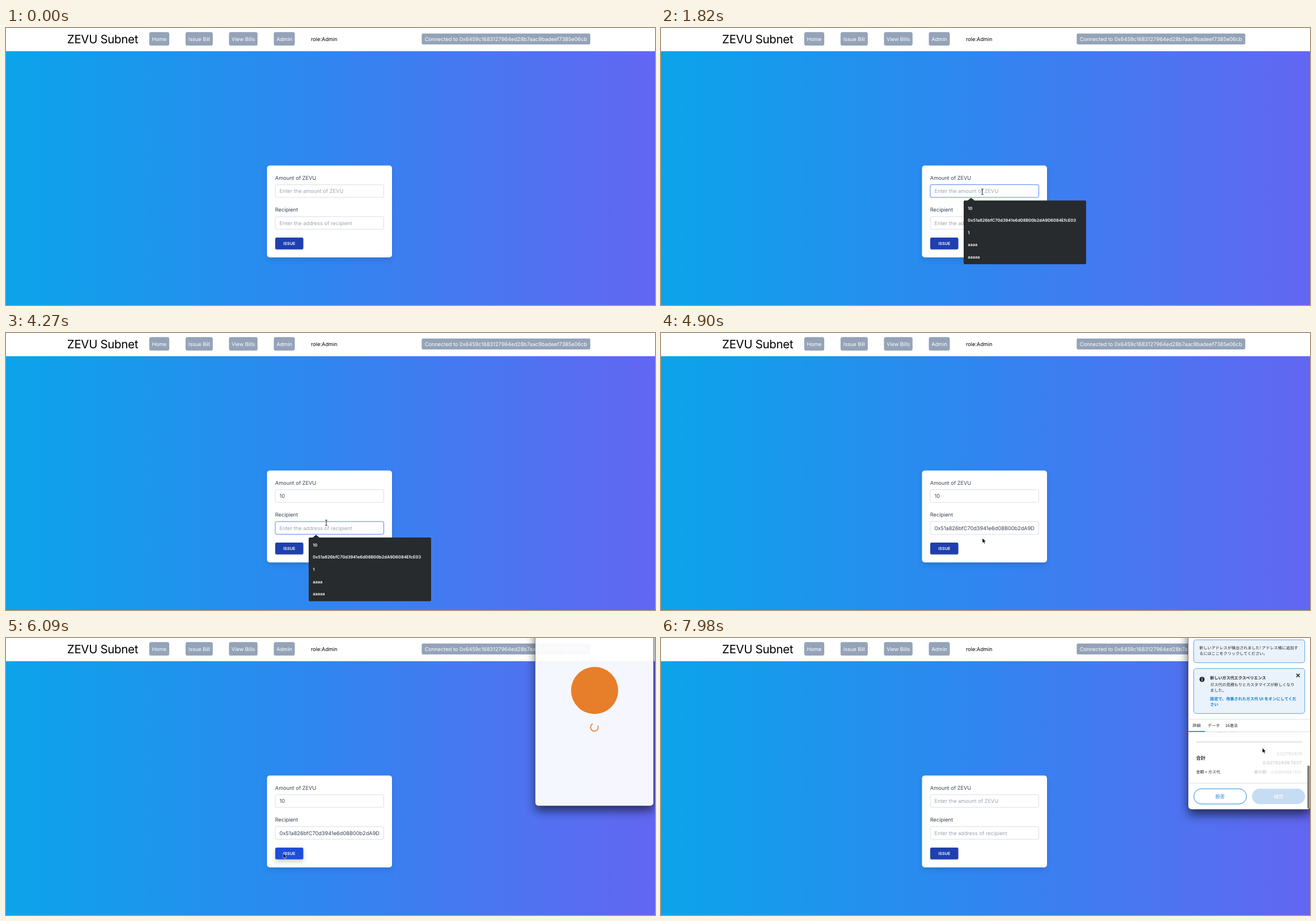
Recreate the animation shown at these times as an HTML page. Size 1145 by 489 pixels, loop 8000 ms.

```html
<!DOCTYPE html>
<html lang="en">
<head>
<meta charset="utf-8">
<title>Issue Bill</title>
<style>
html, body { margin: 0; width: 100%; height: 100%; overflow: hidden; background: #fff; }
svg { display: block; width: 100%; height: 100%; }
text { font: 9.2px Inter, "Open Sans", sans-serif; text-rendering: geometricPrecision; white-space: pre; }
.mid { text-anchor: middle; }
.end { text-anchor: end; }
.title { font-size: 20.5px; letter-spacing: -.35px; text-anchor: end; }
.nav rect { fill: #94a3b8; }
.nav text { fill: #fff; }
.card { fill: #fff; filter: drop-shadow(0 5px 5px rgba(0,0,0,.1)); }
.label { fill: #374151; }
.box { fill: #fff; stroke: #d1d5db; stroke-width: .8; }
.box.on { stroke: #2563eb; }
.value { fill: #9ca3af; }
.value.set { fill: #374151; }
.issue rect { fill: #1e40af; filter: drop-shadow(0 1.5px 1.5px rgba(0,0,0,.2)); }
.issue.hot rect { fill: #1d4ed8; filter: drop-shadow(0 4px 4px rgba(0,0,0,.2)); }
.issue text { font-size: 7.2px; font-weight: 600; fill: #fff; }
.menu { fill: #282b2d; }
.menu text { font-size: 7.4px; font-weight: 600; fill: #fff; }
.frame { fill: #fff; stroke: rgba(0,0,0,.65); stroke-width: .7; filter: drop-shadow(0 9px 9px rgba(0,0,0,.6)); }
.ja text { font: 7.1px "Noto Sans CJK JP", "Noto Sans CJK", sans-serif; fill: #24272a; }
.ja .b { font-weight: 700; }
.ja .link { fill: #037dd6; font-weight: 700; }
.ja .num { font-family: Inter, sans-serif; font-size: 7.8px; }
.note { fill: #eaf2fb; stroke: #459bdb; stroke-width: .9; }
.rule { stroke: #d6d9dc; stroke-width: .8; }
</style>
</head>
<body>
<svg viewBox="0 0 1145 489" preserveAspectRatio="none">
  <defs>
    <linearGradient id="sky">
      <stop offset="0" stop-color="#0ba4ea"/>
      <stop offset=".5" stop-color="#3185f0"/>
      <stop offset="1" stop-color="#6366f2"/>
    </linearGradient>
    <clipPath id="details"><rect x="930" y="166" width="216" height="90"/></clipPath>
  </defs>
  <rect width="1145" height="489" fill="#fff"/>
  <rect y="41" width="1145" height="448" fill="url(#sky)"/>

  <text class="title" x="233" y="27">ZEVU Subnet</text>
  <g class="nav">
    <rect x="252.7" y="7.3" width="35.3" height="23.8" rx="3.4"/><text class="mid" x="270.3" y="22.8">Home</text>
    <rect x="316.8" y="7.3" width="48" height="23.8" rx="3.4"/><text class="mid" x="340.8" y="22.8">Issue Bill</text>
    <rect x="393.4" y="7.3" width="50.4" height="23.8" rx="3.4"/><text class="mid" x="418.6" y="22.8">View Bills</text>
    <g id="admin"><rect x="472.5" y="7.3" width="37" height="23.8" rx="3.4"/><text class="mid" x="491" y="22.8">Admin</text></g>
    <g id="wallet"><rect x="733.4" y="9.7" width="297.4" height="19.2" rx="2.4"/><text class="mid" x="882" y="22.8">Connected to 0x6459c1683127964ed28b7aac9badeef7385e06cb</text></g>
  </g>
  <text id="role" y="22.8"></text>

  <rect class="card" x="460.5" y="242.8" width="220.5" height="162.2" rx="4.8"/>
  <text class="label" x="474.8" y="267.8">Amount of ZEVU</text>
  <rect class="box" id="box1" x="475" y="276.6" width="191.5" height="22.4" rx="2.4"/>
  <text class="value" id="val1" x="482.5" y="291.2"></text>
  <text class="label" x="474.8" y="324.2">Recipient</text>
  <rect class="box" id="box2" x="475" y="332.9" width="191.5" height="22.4" rx="2.4"/>
  <text class="value" id="val2" x="482.5" y="347.5"></text>
  <rect id="caret" width=".8" height="11" fill="#374151"/>
  <g class="issue" id="issue"><rect x="475" y="370" width="49.5" height="20.8" rx="2.4"/><text class="mid" x="499.8" y="383">ISSUE</text></g>

  <g class="menu" id="menu">
    <path d="M540.5 305L547 299.8L553.5 305Z"/>
    <rect x="534" y="304.5" width="216" height="112.5" rx="2"/>
    <text x="541.3" y="320.5">10</text>
    <text x="541.3" y="342.1">0x51a826bfC70d3941e6d08B00b2dA9D6084EfcE03</text>
    <text x="541.3" y="363.7">1</text>
    <text x="541.3" y="385.3">aaaa</text>
    <text x="541.3" y="406.9">aaaaa</text>
  </g>

  <g id="popup">
    <rect class="frame" x="930" y="-76" width="216" height="378.7" rx="6"/>
    <g id="loading">
      <circle cx="1038.5" cy="92" r="43" fill="#f0801f"/>
      <path id="spinner" d="M1038 166.2A7 7 0 1 1 1045 159.2" fill="none" stroke="#f0801f" stroke-width="1.8"/>
    </g>
    <g id="confirm" class="ja" lang="ja">
      <rect class="note" x="939.8" y="3.2" width="196" height="40.4" rx="4.5"/>
      <text x="949.8" y="20">新しいアドレスが検出されました! アドレス帳に追加す</text>
      <text x="949.8" y="30.4">るにはここをクリックしてください。</text>
      <rect class="note" x="939.8" y="53.8" width="196" height="79.5" rx="4.5"/>
      <circle cx="954.5" cy="73" r="4.5" fill="#24272a"/>
      <path d="M954.5 70.2V71.4M954.5 72.4V75.8" stroke="#fff" stroke-width="1.2"/>
      <path d="M1121 63.2L1126.8 69M1126.8 63.2L1121 69" stroke="#111" stroke-width="1.4"/>
      <text class="b" x="968.8" y="73">新しいガス代エクスペリエンス</text>
      <text x="968.8" y="85">ガス代の見積もりとカスタマイズが新しくなり</text>
      <text x="968.8" y="95">ました。</text>
      <text class="link" x="968.8" y="110">設定で、改善されたガス代 UI をオンにしてくだ</text>
      <text class="link" x="968.8" y="120.2">さい</text>
      <path class="rule" d="M930.4 143.4H1145M930.4 165.5H1145M930.4 256.3H1145"/>
      <text x="937.8" y="156.8">詳細</text>
      <text x="964.6" y="156.8">データ</text>
      <text x="995.4" y="156.8">16進法</text>
      <path d="M930.4 165H960" stroke="#037dd6" stroke-width="1.5"/>
      <g clip-path="url(#details)">
        <text x="953" y="166.4" opacity=".55">サイトの提案 &gt; 最大</text>
        <path d="M944 183.6H1131" stroke="#bbc0c5" stroke-width=".9"/>
        <text class="b" x="944" y="214.6" style="font-size:8.4px">合計</text>
        <text x="944" y="238.6">金額 + ガス代</text>
        <g id="totals">
          <text class="num end" x="1131" y="206.8">0.02792409</text>
          <text class="num b end" x="1131" y="222.8">0.02792409 TEST</text>
          <text class="b end" x="1070" y="238.6">最大額:</text>
          <text class="num end" x="1131" y="238.6" style="font-size:6.5px">0.02861508 TEST</text>
        </g>
      </g>
      <rect x="940" y="266.2" width="93" height="26.8" rx="13.4" fill="#fff" stroke="#037dd6" stroke-width=".9"/>
      <text class="link mid" x="986.3" y="282.6" style="font-size:8.4px;font-weight:500">拒否</text>
      <rect x="1042.7" y="266" width="93.5" height="27.2" rx="13.6" fill="#c5dcf3"/>
      <text class="mid" x="1089.5" y="282.6" style="font-size:8.4px;font-weight:500;fill:#fff">確認</text>
      <rect x="1140.3" y="225" width="4.2" height="76" rx="2.1" fill="#7d7d7d"/>
    </g>
  </g>

  <g id="cursor">
    <path id="arrow" d="M0 0V8.7L2 6.9 3.4 10.1 4.9 9.5 3.5 6.4 6.2 6.3Z" fill="#000" stroke="#fff" stroke-width=".6"/>
    <path id="hand" d="M-1 .2Q0-.8 1 .2V3.4Q4.5 3.5 4.6 5V7.5Q4 9 3.6 10.3H-1Q-3.6 6.5-3.9 5.2Q-3 4.2-1 6Z" fill="#fff" stroke="#000" stroke-width=".8"/>
    <path id="beam" d="M-2-5Q0-5 0-3.8Q0-5 2-5M0-4V4M-2 5Q0 5 0 3.8Q0 5 2 5" fill="none" stroke="#111" stroke-width=".9"/>
  </g>
</svg>
<script>
const LOOP = 8000, STEP = 70;
const ADDRESS = '0x51a826bfC70d3941e6d08B00b2dA9D';
const $ = Object.fromEntries([...document.querySelectorAll('[id]')].map(e => [e.id, e]));

// time, x, y of the pointer
const path = [
  [350, 568, 424], [490, 568, 374], [630, 567, 309], [770, 567, 289],
  [2800, 567, 289], [2940, 568, 330], [3010, 567, 357], [3150, 566, 354], [3500, 564.5, 349],
  [3990, 564.5, 349], [4060, 564.5, 340], [4130, 565, 336], [4270, 565, 335],
  [4620, 565, 335], [4900, 567, 362], [5110, 566, 380],
  [5180, 566, 380], [5320, 530, 380], [5460, 494, 380], [5530, 489, 380],
  [6090, 489, 380], [6230, 700, 300], [6440, 1020, 192], [6650, 1061, 194]
];

const between = (t, a, b) => t >= a && t < b;
const ramp = (t, a, b) => Math.min(1, Math.max(0, (t - a) / (b - a)));
const show = (el, on) => { el.style.display = on ? '' : 'none'; };

function pointerAt(t) {
  const i = path.findIndex(p => p[0] > t);
  if (i < 0) return path[path.length - 1].slice(1);
  if (i === 0) return path[0].slice(1);
  const [t0, x0, y0] = path[i - 1], [t1, x1, y1] = path[i];
  const k = ramp(t, t0, t1);
  return [x0 + (x1 - x0) * k, y0 + (y1 - y0) * k];
}

function drawPointer(t) {
  const [x, y] = pointerAt(t);
  const overField = between(x, 475, 667) && (between(y, 276, 299) || between(y, 332, 356));
  const overButton = between(x, 475, 525) && between(y, 370, 391) && t < 5950;
  show($.cursor, t >= 350);
  show($.beam, overField);
  show($.hand, overButton);
  show($.arrow, !overField && !overButton);
  $.cursor.setAttribute('transform', `translate(${x} ${y})`);
}

function setField(value, text, hint) {
  value.textContent = text || hint;
  value.classList.toggle('set', !!text);
}

function drawForm(t) {
  const second = t >= 3290;
  setField($.val1, between(t, 2240, 6370) && '10', 'Enter the amount of ZEVU');
  setField($.val2, between(t, 4410, 6370) && ADDRESS, 'Enter the address of recipient');
  $.box1.classList.toggle('on', between(t, 1260, 3290));
  $.box2.classList.toggle('on', between(t, 3290, 4830));
  $.issue.classList.toggle('hot', between(t, 5320, 6370));

  show($.caret, between(t, 1260, 1820) || between(t, 2240, 2870) || between(t, 3290, 3920));
  $.caret.setAttribute('x', between(t, 2240, 3290) ? 493 : 482.3);
  $.caret.setAttribute('y', second ? 338.6 : 282.3);

  const open = second
    ? ramp(t, 3220, 3430) * (t < 4410)
    : ramp(t, 1190, 1400) * (1 - ramp(t, 2170, 2380));
  $.menu.setAttribute('opacity', open);
  $.menu.setAttribute('transform', `translate(0 ${second ? 56.4 : 0})`);
}

function drawNav(t) {
  const admin = !between(t, 6370, 7350);
  show($.admin, admin);
  show($.wallet, !between(t, 6440, 6580));
  $.role.textContent = admin ? 'role:Admin' : 'role:None';
  $.role.setAttribute('x', admin ? 538 : 501);
}

function drawPopup(t) {
  const k = ramp(t, 5950, 6230);
  const scale = 1 - .132 * (1 - k) ** 2;
  const ready = t >= 7420;
  show($.popup, k > 0);
  $.popup.setAttribute('opacity', Math.min(1, .55 + .79 * k));
  $.popup.setAttribute('transform', `translate(1038 113) scale(${scale}) translate(-1038 -113)`);
  show($.loading, !ready);
  show($.confirm, ready);
  $.spinner.setAttribute('transform', `rotate(${(t - 7280) * .4} 1038 159.2)`);
  $.totals.setAttribute('opacity', 1 - .8 * ramp(t, 7560, 7980));
}

function render(ms) {
  const t = Math.floor((ms % LOOP) / STEP + 1e-6) * STEP;
  drawNav(t);
  drawForm(t);
  drawPopup(t);
  drawPointer(t);
}

const start = performance.now();
function tick() {
  render(performance.now() - start);
  requestAnimationFrame(tick);
}
tick();
</script>
</body>
</html>
```
